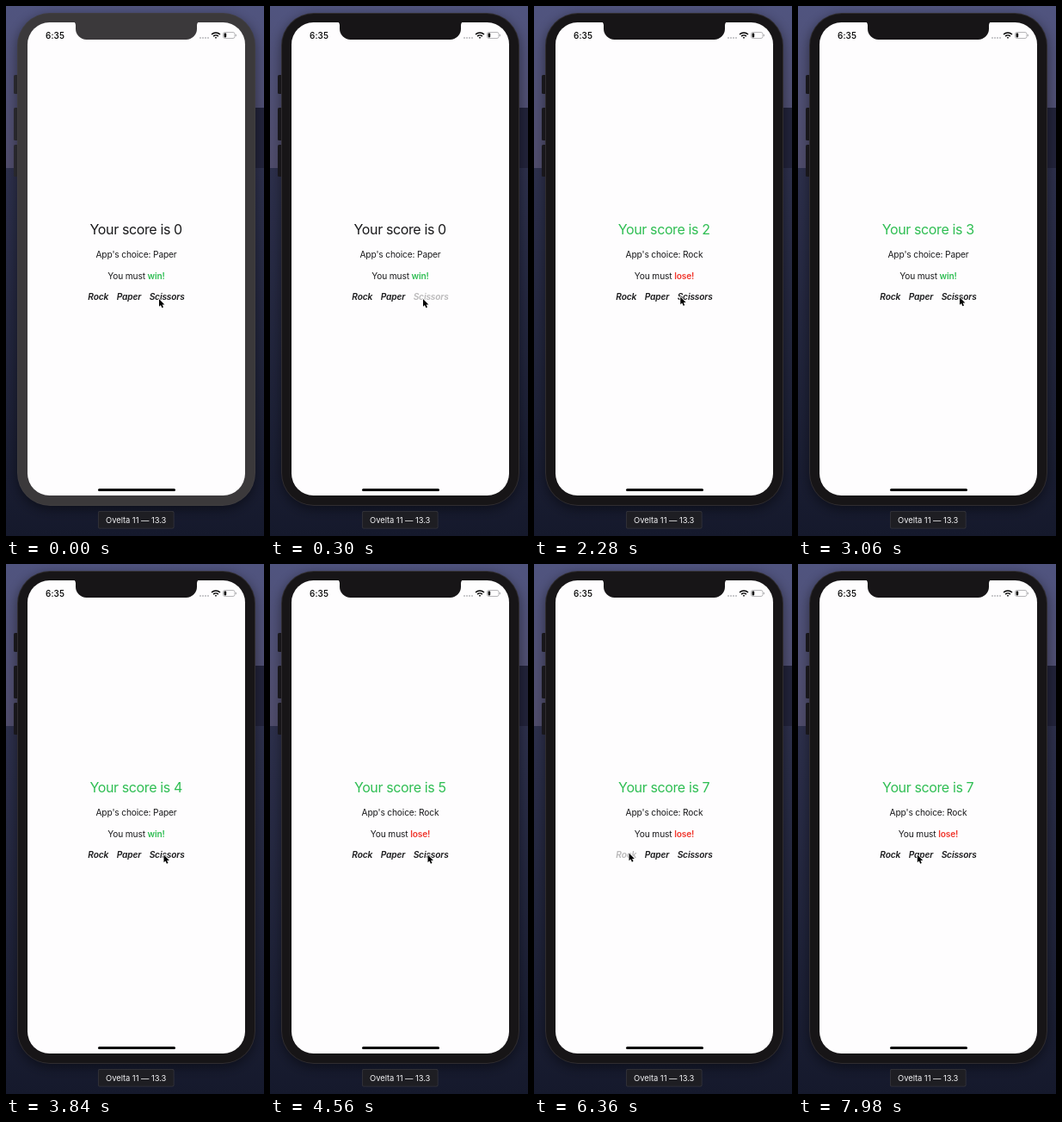
Write an HTML page with a canvas that moves like this. It is 300 px wide and 615 px high and loops after 8000 ms.

```html
<!DOCTYPE html>
<html lang="en">
<head>
<meta charset="utf-8">
<title>Rock Paper Scissors</title>
<style>
html, body { margin: 0; width: 100%; height: 100%; overflow: hidden; background: #22243c; }
canvas { display: block; width: 300px; height: 615px; }
</style>
</head>
<body>
<canvas id="stage" width="300" height="615"></canvas>
<script>
const ctx = document.getElementById('stage').getContext('2d');
const LOOP = 8000, TICK = 60, MIDDLE = 151.5;
const INK = '#19191b', GREEN = '#2fbe53', RED = '#f0352b';
const MOVES = ['Rock', 'Paper', 'Scissors'];

const round = (start, choice, goal) => ({ start, choice, goal });
const rounds = [
  round(0, 'Paper', 'win!'), round(420, 'Paper', 'lose!'),
  round(1680, 'Rock', 'lose!'), round(2640, 'Paper', 'win!'),
  round(3420, 'Paper', 'win!'), round(4140, 'Rock', 'lose!'),
  round(4920, 'Paper', 'lose!'), round(6300, 'Rock', 'lose!')
];

// Each move beats the one before it in the cycle.
function answer({ choice, goal }) {
  const step = goal === 'win!' ? 1 : 2;
  return MOVES[(MOVES.indexOf(choice) + step) % 3];
}

// The right answer to a round is tapped when the next round starts.
const taps = rounds.slice(1).map((r, i) => ({ time: r.start, move: answer(rounds[i]) }));

const leg = (from, to, x, y) => ({ from, to, x, y });
const legs = [
  leg(1080, 1280, 110.5, 336), leg(1980, 2415, 188, 338),
  leg(3480, 3600, 183.5, 337.5), leg(5340, 6000, 110.5, 335.5),
  leg(7620, 8500, 188, 341)
];

const clamp = u => Math.min(1, Math.max(0, u));
const ease = u => u * u * (3 - 2 * u);

function pointerAt(t) {
  let x = 178, y = 340;
  for (const l of legs) {
    const k = ease(clamp((t - l.from) / (l.to - l.from)));
    x += (l.x - x) * k;
    y += (l.y - y) * k;
  }
  return [x, y];
}

// Dims while held, then fades back after release.
function tapAlpha(move, t) {
  const tap = taps.find(p => p.move === move && t >= p.time - 120 && t < p.time + 300);
  return tap ? 0.3 + 0.7 * clamp((t - tap.time - 60) / 240) : 1;
}

function box(x, y, w, h, r, fill) {
  ctx.beginPath();
  ctx.roundRect(x, y, w, h, r);
  ctx.fillStyle = fill;
  ctx.fill();
}

function setFont(size, style, track) {
  ctx.font = `${style} ${size}px Inter, sans-serif`;
  ctx.letterSpacing = track + 'px';
}

function label(text, x, y, fill, align = 'center') {
  ctx.textAlign = align;
  ctx.fillStyle = fill;
  ctx.fillText(text, x, y);
}

function fade(y, h, top, bottom) {
  const g = ctx.createLinearGradient(0, y, 0, y + h);
  g.addColorStop(0, top);
  g.addColorStop(1, bottom);
  return g;
}

function drawWallpaper() {
  box(0, 0, 300, 188, 0, fade(0, 188, '#50547f', '#504d6c'));
  box(0, 188, 300, 427, 0, fade(188, 427, '#2d304c', '#15192c'));
  box(285, 118, 15, 70, 0, '#22233a');
}

function drawNotch(fill) {
  ctx.beginPath();
  ctx.moveTo(76, 18);
  ctx.arcTo(81, 18.5, 81, 24, 4.5);
  ctx.arcTo(81, 39, 96, 39, 12.5);
  ctx.arcTo(222, 39, 222, 24, 12.5);
  ctx.arcTo(222, 18.5, 227, 18, 4.5);
  ctx.lineTo(227, 18);
  ctx.fillStyle = fill;
  ctx.fill();
}

function drawPhone(active) {
  const body = active ? '#171517' : '#3b393b';
  const key = active ? '#1d1b20' : '#302f35';
  box(9, 80, 6, 22, 1.5, key);
  box(9, 118, 6, 38, 1.5, key);
  box(9, 161, 6, 37, 1.5, key);
  ctx.shadowColor = 'rgba(0, 0, 0, 0.45)';
  ctx.shadowBlur = 14;
  ctx.shadowOffsetY = 4;
  box(13, 8, 277, 572, 38, active ? '#302d30' : '#403e40');
  ctx.shadowColor = 'transparent';
  box(14, 9, 275, 570, 37, body);
  box(25, 19, 253, 549, 25.5, '#fefdfe');
  drawNotch(body);
  box(107, 560, 90, 3, 1.5, '#000');
}

function drawStatus() {
  setFont(10, '500', 0.1);
  label('6:35', 57, 38, '#000');
  for (let i = 0; i < 4; i++) box(225 + i * 3, 36, 2, 2, 1, '#b9b9bc');

  ctx.lineWidth = 1.6;
  ctx.strokeStyle = '#000';
  for (let r = 1; r <= 7; r += 3) {
    ctx.beginPath();
    ctx.arc(244, 38, r, -Math.PI * 0.75, -Math.PI * 0.25);
    ctx.stroke();
  }

  ctx.beginPath();
  ctx.roundRect(252.5, 30.5, 13.5, 7, 2);
  ctx.lineWidth = 0.8;
  ctx.strokeStyle = '#a5a5a8';
  ctx.stroke();
  box(253.6, 31.6, 2.6, 4.8, 0.8, '#000');
  box(266.8, 32.8, 1, 2.4, 0.5, '#a5a5a8');
}

function drawGoal(goal, y) {
  const lead = 'You must ';
  setFont(10.2, '600', -0.15);
  const goalWidth = ctx.measureText(goal).width;
  setFont(10.2, '400', -0.15);
  const leadWidth = ctx.measureText(lead).width;
  const left = MIDDLE - (leadWidth + goalWidth) / 2;
  label(lead, left, y, INK, 'left');
  setFont(10.2, '600', -0.15);
  label(goal, left + leadWidth, y, goal === 'win!' ? GREEN : RED, 'left');
}

function drawButtons(t) {
  const gap = 9.5;
  setFont(10.2, 'italic 600', -0.15);
  const widths = MOVES.map(m => ctx.measureText(m).width);
  let x = MIDDLE - gap - widths.reduce((a, b) => a + b) / 2;
  MOVES.forEach((move, i) => {
    ctx.globalAlpha = tapAlpha(move, t);
    label(move, x, 341, INK, 'left');
    x += widths[i] + gap;
  });
  ctx.globalAlpha = 1;
}

function drawGame(t) {
  const score = rounds.filter(r => r.start <= t).length - 1;
  const { choice, goal } = rounds[score];
  setFont(16, '400', -0.38);
  label(`Your score is ${score}`, MIDDLE - 0.3, 265, score ? GREEN : INK);
  setFont(10.2, '400', -0.15);
  label(`App's choice: ${choice}`, MIDDLE, 291.5, INK);
  drawGoal(goal, 316.5);
  drawButtons(t);
}

function drawCaption() {
  box(107, 586, 88.5, 20.5, 2, '#35353c');
  box(107.8, 586.8, 86.9, 18.9, 1.5, '#1e1e23');
  setFont(9.4, '400', -0.05);
  label('Ovelta 11 — 13.3', 151.2, 599.5, '#f2f2f4');
}

const arrow = new Path2D('M0 0V8.8L2 7L3.4 10.3L5 9.6L3.6 6.4H6.4Z');

function drawPointer(t) {
  ctx.save();
  ctx.translate(...pointerAt(t));
  ctx.lineJoin = 'round';
  ctx.lineWidth = 1.5;
  ctx.strokeStyle = '#fff';
  ctx.stroke(arrow);
  ctx.fillStyle = '#000';
  ctx.fill(arrow);
  ctx.restore();
}

function frame() {
  const t = Math.floor((performance.now() % LOOP) / TICK) * TICK;
  drawWallpaper();
  drawPhone(t >= TICK);
  drawStatus();
  drawGame(t);
  drawCaption();
  drawPointer(t);
  requestAnimationFrame(frame);
}
frame();
</script>
</body>
</html>
```
